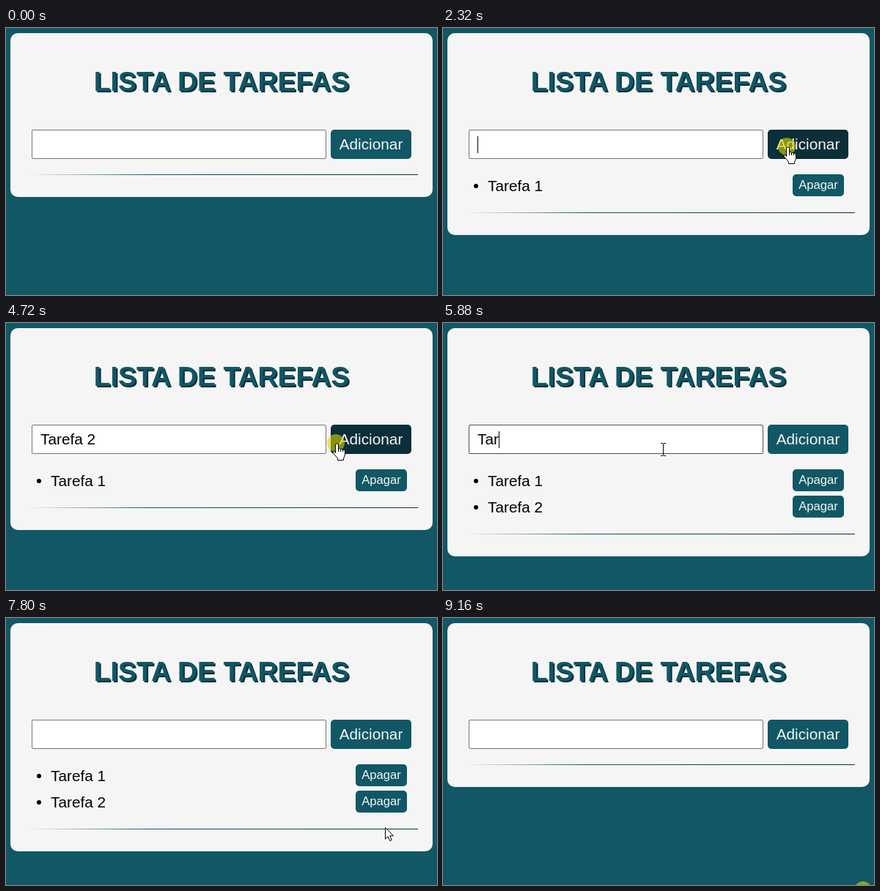
Write an HTML page with a canvas that moves like this. It is 588 px wide and 365 px high and loops after 9.26 s.

```html
<!DOCTYPE html>
<html lang="pt">
<head>
<meta charset="utf-8">
<title>Lista de tarefas</title>
<style>
  :root { --teal: #115765; --dark: #0a2f39; }
  * { box-sizing: border-box; }
  html, body { margin: 0; width: 100%; height: 100%; overflow: hidden; background: var(--teal); }
  body { position: relative; font: 20.8px/40px "Liberation Sans", Arial, sans-serif; color: #000; }
  body * { position: absolute; margin: 0; white-space: pre; }
  #panel { left: 6px; top: 7px; width: 576px; border-radius: 10px; background: #f5f5f5; }
  h1 { left: 6px; top: 52px; width: 576px; text-align: center; font-size: 37.44px; line-height: 42px;
       color: var(--teal); text-shadow: 2px 2px var(--dark); }
  #field { left: 35px; top: 139px; width: 402px; height: 40px; border: 1px solid #767676;
           border-radius: 2px; background: #fff; }
  #text { left: 11px; top: -1px; }
  .btn { background: var(--teal); color: #f5f5f5; border-radius: 5px; text-align: center; }
  .btn.hover { background: var(--dark); }
  #add { left: 443px; top: 139px; width: 110px; height: 40px; }
  .task { left: 61px; width: 490px; height: 30px; line-height: 31px; }
  .task::before { content: ""; position: absolute; left: -19px; top: 13px; width: 6px; height: 6px;
                  border-radius: 3px; background: #000; }
  .task .btn { left: 416px; top: 0; width: 70px; height: 30px; font-size: 16.64px; line-height: 29px; }
  #rule { left: 26px; width: 536px; height: 1px;
          background: linear-gradient(to right, #f5f5f5 1%, var(--teal) 32%, var(--dark)); }
  canvas { left: 0; top: 0; }
</style>
</head>
<body>
<div id="panel"></div>
<h1>LISTA DE TAREFAS</h1>
<div id="field"><span id="text"></span></div>
<div id="add" class="btn">Adicionar</div>
<div id="rule"></div>
<canvas id="layer" width="588" height="365"></canvas>
<script>
const LOOP = 9260;
const $ = id => document.getElementById(id);
const panel = $('panel'), field = $('field'), text = $('text'), add = $('add'), rule = $('rule');
const ctx = $('layer').getContext('2d');

// Pointer stops: time, x, y
const path = [
  [100, 270, 318], [310, 192, 173], [1020, 192, 173], [1150, 191, 172], [1350, 191, 172],
  [1800, 235, 180], [2230, 469, 162], [2340, 469, 162], [2500, 296, 172], [3520, 296, 172],
  [4270, 295, 173], [4470, 295, 173], [4690, 450, 164], [4800, 450, 164], [5070, 300, 173],
  [6240, 300, 173], [6600, 441, 168], [6650, 473, 166], [7090, 473, 166], [7540, 517, 287],
  [7700, 517, 286], [7810, 517, 286], [7940, 516, 251], [8290, 516, 251], [8460, 515, 216],
  [8610, 515, 216], [8990, 573, 372]
];
const presses = [[460, 580], [2240, 2400], [4700, 4850], [6660, 6800],
                 [7700, 7780], [8170, 8270], [8490, 8590], [9160, 9260]];
// Typed entries: first key, second key, key interval, submit
const entries = [[1020, 1350, 100, 2320], [3160, 3520, 125, 4790], [5300, 5680, 110, 6740]];
const removals = [7780, 8270, 8580];
const FOCUS = 510, BLUR = 7700, BLINK = 510;

const tasks = [1, 2, 3].map(n => {
  const row = document.createElement('div');
  row.className = 'task';
  row.textContent = 'Tarefa ' + n;
  row.style.top = 164 + 36 * n + 'px';
  const btn = document.createElement('div');
  btn.className = 'btn';
  btn.textContent = 'Apagar';
  row.append(btn);
  document.body.insertBefore(row, $('layer'));
  return { row, btn };
});

function pointerAt(t) {
  if (t < path[0][0]) return [-50, -50];
  const i = path.findIndex(p => p[0] > t);
  if (i < 0) return path[path.length - 1].slice(1);
  const [t0, x0, y0] = path[i - 1], [t1, x1, y1] = path[i];
  const u = (t - t0) / (t1 - t0), e = u * u * (3 - 2 * u);
  return [x0 + (x1 - x0) * e, y0 + (y1 - y0) * e];
}

function typing(t) {
  let value = '', last = FOCUS;
  entries.forEach(([first, second, step, submit], i) => {
    if (t >= submit) { last = submit; return; }
    if (t < first) return;
    const extra = t < second ? -1 : Math.min(6, Math.floor((t - second) / step));
    value = ('Tarefa ' + (i + 1)).slice(0, 2 + extra);
    last = extra < 0 ? first : second + extra * step;
  });
  return { value, last };
}

const inside = (x, y, l, t, w, h) => x >= l && x < l + w && y >= t && y < t + h;

function outline(d, x, y) {
  const shape = new Path2D(d);
  ctx.save();
  ctx.translate(x, y);
  ctx.fillStyle = '#fff';
  ctx.strokeStyle = '#000';
  ctx.lineJoin = 'round';
  ctx.fill(shape);
  ctx.stroke(shape);
  ctx.restore();
}

const cursors = {
  arrow(x, y) {
    outline('M.5.5V16.2L4.2 12.8 6.7 18.6 9.2 17.5 6.8 11.8H11.5Z', x, y);
  },
  hand(x, y) {
    outline('M-.5 2Q1.5-.5 3.5 2V8Q5.5 6.5 6.5 8.5 8.5 7.5 9.5 9.5 12 8.5 12.5 11V16Q12 19 10.5 21V23.5H2.5V21' +
            'Q-1 17-3.8 13.5-4.5 11-2.5 11.5L-.5 13.5Z', x, y);
    ctx.fillStyle = '#000';
    for (const dx of [3, 6, 9]) ctx.fillRect(x + dx, y + 8, 1, 4);
  },
  beam(x, y) {
    ctx.fillStyle = '#000';
    ctx.fillRect(x, y - 8, 1, 16);
    for (const dy of [-9, 8]) {
      ctx.fillRect(x - 3, y + dy, 3, 1);
      ctx.fillRect(x + 1, y + dy, 3, 1);
    }
  }
};

function render(t) {
  const [px, py] = pointerAt(t);
  const x = Math.round(px), y = Math.round(py);
  const pressed = presses.some(([a, b]) => t >= a && t < b);
  const count = entries.filter(e => t >= e[3]).length - removals.filter(r => t >= r).length;
  const { value, last } = typing(t);

  const bottom = count ? 247 + 36 * count : 231;
  panel.style.height = bottom - 7 + 'px';
  rule.style.top = bottom - 31 + 'px';

  const onAdd = inside(x, y, 443, 139, 110, 40);
  const onField = inside(x, y, 35, 139, 402, 40);
  let onTask = false;
  add.classList.toggle('hover', onAdd);
  tasks.forEach(({ row, btn }, i) => {
    const over = i < count && inside(x, y, 477, 200 + 36 * i, 70, 30);
    row.style.display = i < count ? '' : 'none';
    btn.classList.toggle('hover', over);
    onTask = onTask || over;
  });
  field.style.borderColor = !inside(x, y, 35, 137, 402, 44) ? '#767676' : pressed ? '#858585' : '#4f4f4f';
  text.textContent = value;

  ctx.clearRect(0, 0, 588, 365);
  const submitting = entries.some(e => t >= e[3] - 90 && t < e[3]);
  if (t >= FOCUS && t < BLUR && !submitting && (t - last) % (2 * BLINK) < BLINK) {
    ctx.fillStyle = '#000';
    ctx.fillRect(47 + Math.round(text.getBoundingClientRect().width), 148, 1, 23);
  }
  if (pressed) {
    ctx.fillStyle = 'rgba(220, 215, 0, .6)';
    ctx.beginPath();
    ctx.arc(x, y, 12, 0, 2 * Math.PI);
    ctx.fill();
  }
  cursors[onAdd || onTask ? 'hand' : onField ? 'beam' : 'arrow'](x, y);
}

const start = performance.now();
function tick() {
  render((performance.now() - start) % LOOP);
  requestAnimationFrame(tick);
}
tick();
</script>
</body>
</html>
```
